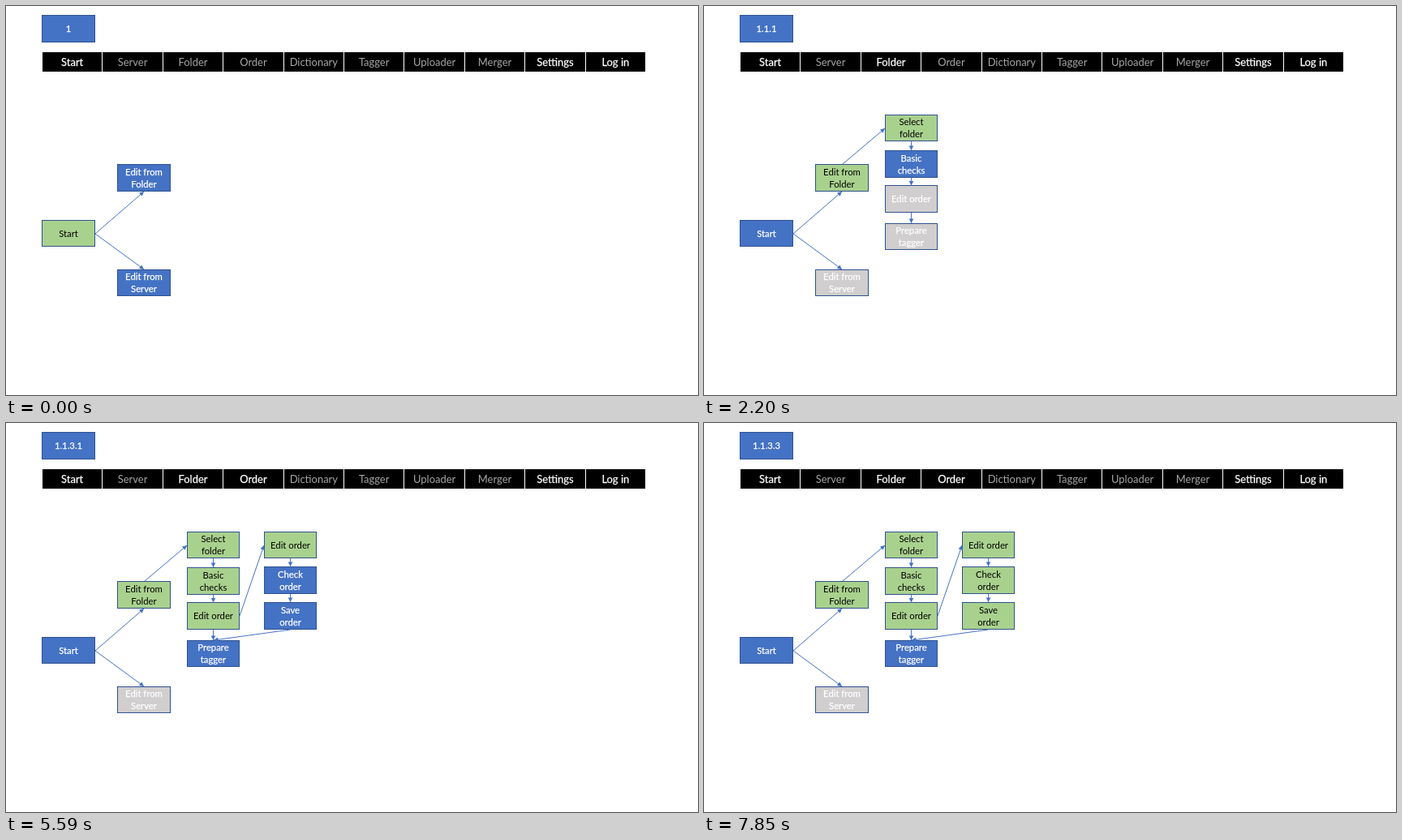
An HTML page for the animation above (8 s loop, 853 px wide and 480 px high).

```html
<!DOCTYPE html>
<html lang="en">
<head>
<meta charset="utf-8">
<title>Workflow steps</title>
<style>
  html, body { margin: 0; width: 100%; height: 100%; overflow: hidden; background: #fff; }
  svg { display: block; width: 853px; height: 480px; }
  text { font: 11.3px Lato, Carlito, sans-serif; text-anchor: middle; }
  .nav { font-size: 12.95px; }
  .bright { stroke: #fff; stroke-width: .25px; }
</style>
</head>
<body>
<svg id="stage" viewBox="0 0 853 480"></svg>
<script>
const LOOP = 8000, FIRST = 1070, HOLD = 1130;
const STEPS = ["1", "1.1", "1.1.1", "1.1.2", "1.1.3", "1.1.3.1", "1.1.3.2", "1.1.3.3"];

// Menu entries with the step at which each one lights up.
const MENU = [["Start", 0], ["Server", 99], ["Folder", 1], ["Order", 4], ["Dictionary", 99],
  ["Tagger", 99], ["Uploader", 99], ["Merger", 99], ["Settings", 0], ["Log in", 0]];

const FILL = { b: "#4472c4", g: "#a9d18e", x: "#d0cece" };

// Label, x, y, width, height, and one state per step: b open, g current or done, x disabled, . hidden.
const NODES = [
  ["Start", 44.5, 264.5, 65, 32, "gbbbbbbb"],
  ["Edit from|Folder", 137.5, 195.5, 65, 33, "bggggggg"],
  ["Edit from|Server", 137.5, 325.5, 65, 32, "bxxxxxxx"],
  ["Select|folder", 223.5, 134.5, 64, 32, ".bgggggg"],
  ["Basic|checks", 223.5, 178.5, 64, 33, ".xbggggg"],
  ["Edit order", 223.5, 221.5, 64, 33, ".xxbgggg"],
  ["Prepare|tagger", 223.5, 268.5, 64, 32, ".xxbbbbb"],
  ["Edit order", 318.5, 134.5, 64, 32, "....bggg"],
  ["Check|order", 318.5, 177.5, 64, 33, "....bbgg"],
  ["Save|order", 318.5, 221.5, 64, 33, "....bbbg"]
];

// First visible step, then start and end point.
const ARROWS = [
  [0, 110, 281, 170, 229], [0, 110, 281, 170, 325],
  [1, 171, 195, 223, 151], [1, 255.5, 167, 255.5, 178],
  [1, 255.5, 212, 255.5, 221.5], [1, 255.5, 255, 255.5, 268],
  [4, 288, 238, 318, 151], [4, 350.5, 167, 350.5, 177],
  [4, 350.5, 211, 350.5, 221], [4, 350.5, 255, 256, 268]
];

function label(text, x, y, color, cls = "") {
  const bright = color === "#fff" ? "bright" : "";
  return `<text class="${cls} ${bright}" x="${x}" y="${y}" fill="${color}">${text}</text>`;
}

function node([text, x, y, w, h, states], step) {
  const state = states[step];
  if (state === ".") return "";
  const lines = text.split("|");
  const color = state === "g" ? "#000" : "#fff";
  const top = y + h / 2 + 4 - (lines.length - 1) * 7.5;
  return `<rect x="${x}" y="${y}" width="${w}" height="${h}" fill="${FILL[state]}" stroke="#2f528f"/>` +
    lines.map((line, i) => label(line, x + w / 2, Math.round(top + i * 15), color)).join("");
}

function arrow([from, x1, y1, x2, y2], step) {
  if (step < from) return "";
  const angle = Math.atan2(y2 - y1, x2 - x1) * 180 / Math.PI;
  return `<path d="M${x1} ${y1}L${x2} ${y2}" stroke="#4472c4"/>` +
    `<path d="M0 0L-5.5 -2.8V2.8Z" fill="#4472c4" transform="translate(${x2} ${y2}) rotate(${angle})"/>`;
}

function menu(step) {
  const cell = 74.4;
  return `<rect x="45" y="57" width="743" height="24"/>` + MENU.map(([text, from], i) => {
    const x = 44.5 + i * cell;
    const divider = i ? `<rect x="${Math.floor(x)}" y="57" width="1" height="24" fill="#fff"/>` : "";
    return divider + label(text, x + cell / 2, 74, step >= from ? "#fff" : "#a6a6a6", "nav");
  }).join("");
}

const stage = document.getElementById("stage");
let shown = -1;

function draw(now) {
  const t = now % LOOP;
  const step = t < FIRST ? 0 : 1 + Math.floor((t - FIRST) / HOLD);
  if (step !== shown) {
    shown = step;
    stage.innerHTML = menu(step) +
      node([STEPS[step], 44.5, 11.5, 65, 33, "bbbbbbbb"], step) +
      NODES.map(n => node(n, step)).join("") +
      ARROWS.map(a => arrow(a, step)).join("");
  }
}

const start = performance.now();
function tick() {
  draw(performance.now() - start);
  requestAnimationFrame(tick);
}
tick();
</script>
</body>
</html>
```
